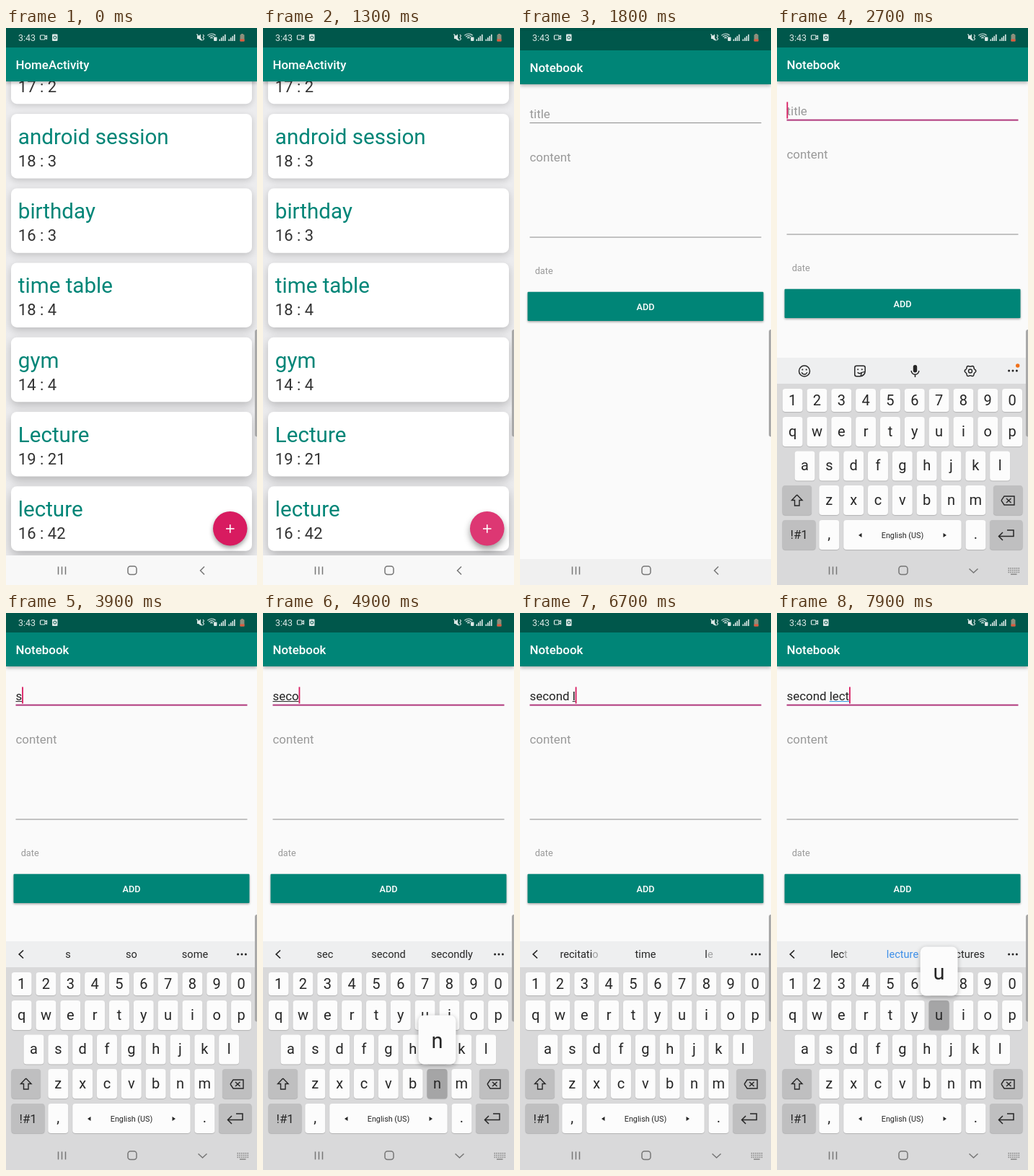
These frames come from a looping animation (348x772 px, 8 s). An HTML page with a canvas:

```html
<!DOCTYPE html>
<html lang="en">
<head>
<meta charset="utf-8">
<title>Notebook</title>
<style>
html, body { margin: 0; width: 348px; height: 772px; overflow: hidden; background: #000; }
canvas { display: block; width: 348px; height: 772px; }
</style>
</head>
<body>
<canvas id="stage"></canvas>
<script>
const W = 348, H = 772, LOOP = 8000, TICK = 100;
const FONT = 'Roboto, "Noto Sans", sans-serif';
const TEAL = '#008577', DARK = '#00574b', PINK = '#d81b60';
const dpr = window.devicePixelRatio || 1;
const stage = document.getElementById('stage');
const layer = document.createElement('canvas');
for (const c of [stage, layer]) { c.width = W * dpr; c.height = H * dpr; }
const main = stage.getContext('2d'), sub = layer.getContext('2d');
main.scale(dpr, dpr);
sub.scale(dpr, dpr);
let g = main;

function rect(x, y, w, h, fill) {
  g.fillStyle = fill;
  g.fillRect(x, y, w, h);
}

function box(x, y, w, h, r) {
  g.beginPath();
  g.roundRect(x, y, w, h, r);
}

function panel(x, y, w, h, r, fill, blur = 0, dy = 0, shade = 0) {
  g.save();
  if (shade) {
    g.shadowColor = `rgba(0,0,0,${shade})`;
    g.shadowBlur = blur * dpr;
    g.shadowOffsetY = dy * dpr;
  }
  g.fillStyle = fill;
  box(x, y, w, h, r);
  g.fill();
  g.restore();
}

function text(s, x, y, size, color, align = 'left', weight = 400) {
  g.font = `${weight} ${size}px ${FONT}`;
  g.textAlign = align;
  g.fillStyle = color;
  g.fillText(s, x, y);
  return g.measureText(s).width;
}

function disc(x, y, r, fill) {
  g.fillStyle = fill;
  g.beginPath();
  g.arc(x, y, r, 0, 7);
  g.fill();
}

function line(color, width, ...pts) {
  g.strokeStyle = color;
  g.lineWidth = width;
  g.beginPath();
  for (let i = 0; i < pts.length; i += 2) g.lineTo(pts[i], pts[i + 1]);
  g.stroke();
}

function outline(color, width, x, y, w, h, r) {
  g.strokeStyle = color;
  g.lineWidth = width;
  box(x, y, w, h, r);
  g.stroke();
}

function ring(color, width, x, y, r, from = 0, to = 2 * Math.PI) {
  g.strokeStyle = color;
  g.lineWidth = width;
  g.beginPath();
  g.arc(x, y, r, from, to);
  g.stroke();
}

function appBar(title) {
  panel(0, 27, W, 47, 0, TEAL, 5, 2, 0.3);
  rect(0, 0, W, 27, DARK);
  text(title, 13.5, 57, 16.9, '#fff', 'left', 500);
}

// ---------- system bars ----------
function statusIcons() {
  const c = '#dce8e6';
  text('3:43', 17, 17.5, 12.4, c);
  outline(c, 1.2, 47.5, 10, 6.5, 6, 1);
  line(c, 1.2, 54, 12, 56.5, 10.8, 56.5, 15.2, 54, 14);
  panel(64, 8.5, 7.5, 9.5, 1, c);
  ring(DARK, 1, 67.8, 13.2, 2);
  g.fillStyle = c;
  g.beginPath();
  for (const p of [[265, 11], [267, 11], [270, 8.5], [270, 17.5], [267, 15], [265, 15]]) g.lineTo(...p);
  g.fill();
  line(c, 1.2, 264.5, 8.5, 272, 17.5);
  line(c, 1.1, 273, 9, 274.5, 11, 273, 13, 274.5, 15, 273, 17);
  for (const r of [8, 5.3, 2.6]) ring(c, 1.2, 285, 16, r, -2.35, -0.8);
  panel(288, 12.5, 4.5, 5.5, 1, c);
  for (const x of [295.5, 308.5])
    for (let i = 0; i < 4; i++) rect(x + i * 2.5, 15.5 - i * 2.2, 1.6, 2.5 + i * 2.2, c);
  panel(324.5, 9, 6, 9.5, 1, '#8c8f7c');
  rect(326, 8, 3, 1, '#8c8f7c');
  rect(324.5, 15.5, 6, 3, '#e0593c');
}

function navIcons(typing) {
  const c = '#767676';
  for (const x of [72.5, 77.5, 82.5]) line(c, 1.5, x, 746.5, x, 757.5);
  outline(c, 1.5, 169, 746, 12, 11.5, 3.5);
  if (!typing) return line(c, 1.5, 275, 746.5, 269.5, 752, 275, 757.5);
  line(c, 1.5, 266.5, 749.5, 272.5, 755, 278.5, 749.5);
  for (let r = 0; r < 3; r++)
    for (let k = 0; k < 6; k++) rect(320.5 + k * 2.8, 748 + r * 2.8, 1.6, 1.6, '#8a8a8a');
  rect(324, 756.4, 8.5, 1.5, '#8a8a8a');
}

// ---------- list screen ----------
const notes = [
  ['', '17 : 2'], ['android session', '18 : 3'], ['birthday', '16 : 3'], ['time table', '18 : 4'],
  ['gym', '14 : 4'], ['Lecture', '19 : 21'], ['lecture', '16 : 42'], ['', '']
];

function home(t) {
  rect(0, 0, W, H, '#ececee');
  notes.forEach(([title, time], i) => {
    const y = 15.7 + i * 103.25;
    panel(7, y, 334, 89.5, 8, '#fff', 9 + i, 2 + i * 0.7, 0.17 + i * 0.012);
    text(title, 16.8, y + 42, 29.6, TEAL);
    text(time, 16.8, y + 73, 22, '#333');
  });
  const held = t >= 1300;
  panel(287, 670, 47.5, 47.5, 24, PINK, held ? 10 : 6, held ? 5 : 3, 0.4);
  if (held) disc(310.75, 693.75, 23.7, `rgba(255,255,255,${t < 1400 ? 0.12 : 0.2})`);
  line('#fff', 1.6, 305, 694, 316.5, 694);
  line('#fff', 1.6, 310.75, 688.2, 310.75, 699.8);
  appBar('HomeActivity');
  rect(0, 731, W, 41, '#f8f8f8');
}

// ---------- typing timeline: [key, pressed, released, shown] ----------
const strokes = [
  ['s', 3700, 3900, 3900], ['e', 4000, 4200, 4200], ['c', 4300, 4500, 4500],
  ['o', 4600, 4800, 4700], ['n', 4900, 5100, 5000], ['d', 5200, 5400, 5500],
  [' ', 6100, 6200, 6300], ['l', 6400, 6600, 6600], ['e', 7100, 7300, 7200],
  ['c', 7300, 7500, 7500], ['t', 7600, 7800, 7700], ['u', 7900, 8100, 8100]
];

// [start, words, fully opaque letters per word, highlighted slot]
const hints = [
  [3900, ['s', 'so', 'some']],
  [4200, ['se', 'see', 'send']],
  [4500, ['sec', 'second', 'secondly']],
  [5500, ['second', 'seconds', 'secondly']],
  [6300, ['recitation', 'time', 'lesson']],
  [6700, ['recitation', 'time', 'le'], [8, 4, 1]],
  [6800, ['l', 'lecture', 'let']],
  [7200, ['le', 'lecture', 'let']],
  [7500, ['lec', 'lecture', 'lectures']],
  [7800, ['lect', 'lecture', 'lectures'], [3, 7, 8], 1]
];

const typed = t => strokes.filter(s => t >= s[3]).map(s => s[0]).join('');

function cursorOn(t) {
  return t >= 2300 && !(t >= 2900 && t < 3400) && !(t >= 5900 && t < 6100);
}

// ---------- editor screen ----------
function editor(t) {
  rect(0, 0, W, H, '#fafafa');
  rect(0, 732, W, 40, '#f0f0f0');
  appBar('Notebook');
  const s = typed(t), size = 16.9;
  let end = 14;
  if (s) {
    end += text(s, 13.5, 120.5, size, '#222');
    const from = s.indexOf(' ') + 1;
    const x = 13.5 + g.measureText(s.slice(0, from)).width;
    if (s.length > from) rect(x, 122, end - x - 0.5, 1.1, t >= 7800 ? '#3a9be0' : '#333');
  } else {
    text('title', 13.5, 120.5, size, '#999');
  }
  if (t >= 2300) rect(13.5, 126.6, 321, 2, '#b0387c');
  else rect(13.5, 127, 321, 1, '#8c8c8c');
  if (cursorOn(t)) rect(end - 0.6, 102.5, 1.8, 23, PINK);
  text('content', 13.5, 181, size, '#999');
  rect(13.5, 285.5, 321, 1, '#8c8c8c');
  text('date', 20.7, 337.2, 12.7, '#999');
  panel(10.5, 361.7, 327, 40.3, 1, TEAL, 3, 1.5, 0.35);
  text('ADD', 174, 386.7, 12.7, '#fff', 'center', 500);
}

// ---------- keyboard ----------
const STEP = 33.83, INK = '#262626';
const rows = [
  ['1234567890', 21.6, 498, 32], ['qwertyuiop', 21.6, 537, 41],
  ['asdfghjkl', 38.5, 584.5, 41], ['zxcvbnm', 72.3, 632, 41]
];

function key(x, y, w, h, fill = '#fcfcfc') {
  panel(x, y, w, h, 4, fill, 1, 0.8, 0.22);
}

function tools() {
  ring(INK, 1.5, 38, 473.5, 7.5);
  disc(35.3, 471.5, 1.1, INK);
  disc(40.7, 471.5, 1.1, INK);
  ring(INK, 1.4, 38, 474, 4, 0.3, 2.84);
  outline(INK, 1.5, 107.8, 466.3, 14.4, 14.4, [2.5, 2.5, 7, 2.5]);
  line(INK, 1.3, 122, 474.5, 117.5, 475.5, 116, 480.5);
  disc(112.2, 471.3, 1, INK);
  disc(117.8, 471.3, 1, INK);
  ring(INK, 1.3, 114.5, 473.5, 3.2, 0.6, 2.6);
  panel(188.8, 465, 5.4, 10.5, 2.7, INK);
  ring(INK, 1.5, 191.5, 473, 5.3, 0, Math.PI);
  line(INK, 1.5, 191.5, 478, 191.5, 482);
  g.strokeStyle = INK;
  g.lineWidth = 1.5;
  g.beginPath();
  for (let i = 0; i < 48; i++) {
    const a = i * Math.PI / 24, r = 7 + 0.8 * Math.cos(6 * a);
    g.lineTo(268 + r * Math.cos(a), 473.5 + r * Math.sin(a));
  }
  g.closePath();
  g.stroke();
  ring(INK, 1.4, 268, 473.5, 2.5);
}

function suggestions(t) {
  line('#222', 1.7, 24, 467.5, 18.2, 473, 24, 478.5);
  const [, words, solid, hot] = hints.filter(h => t >= h[0]).pop();
  words.forEach((word, i) => {
    const n = solid ? solid[i] : word.length, size = 14.6;
    g.font = `400 ${size}px ${FONT}`;
    let x = 86 + i * 88 - g.measureText(word).width / 2;
    x += text(word.slice(0, n), x, 478, size, i === hot ? '#3d8fe8' : INK);
    text(word.slice(n, n + 1), x, 478, size, 'rgba(38,38,38,.38)');
  });
}

function keyboard(t) {
  const down = strokes.find(s => t >= s[1] && t < s[2]);
  const held = down && down[0];
  rect(0, 455, W, 36.5, '#eeeff0');
  rect(0, 491, W, H - 491, '#d9d9da');
  const suggesting = t >= hints[0][0];
  if (suggesting) suggestions(t);
  else tools();
  for (const x of [321.6, 327, 332.4]) disc(x, 473, 1.5, '#222');
  if (!suggesting) disc(333.7, 466, 2.7, '#f0701a');

  let pop = null;
  for (const [chars, x0, y, h] of rows) {
    [...chars].forEach((c, i) => {
      const x = x0 + i * STEP;
      key(x - 14, y, 28, h, c === held ? '#a5a5a6' : undefined);
      text(c, x, y + h / 2 + (h < 40 ? 7.2 : 6.3), 20, INK, 'center');
      if (c === held) pop = [c, x, y];
    });
  }
  const grey = '#bfbfc0';
  key(7.5, 632, 40.5, 41, grey);
  key(300, 632, 40.5, 41, grey);
  key(7.5, 680, 46, 41, grey);
  key(58.3, 680, 28, 41);
  key(92.2, 680, 163.5, 41, held === ' ' ? '#a5a5a6' : undefined);
  key(261.5, 680, 28, 41);
  key(295, 680, 45.5, 41, grey);

  line(INK, 1.4, 27.7, 645, 20.5, 652.5, 24.5, 652.5, 24.5, 660, 31, 660, 31, 652.5, 35, 652.5, 27.7, 645);
  line(INK, 1.4, 311, 653, 315, 647, 329, 647, 329, 659, 315, 659, 311, 653);
  line(INK, 1.4, 318, 650, 324.5, 656);
  line(INK, 1.4, 324.5, 650, 318, 656);
  text('!#1', 30.7, 706.5, 17, INK, 'center');
  text(',', 72.3, 706, 20, INK, 'center');
  text('.', 275.5, 706, 20, INK, 'center');
  text('English (US)', 174, 704.6, 10.8, INK, 'center');
  for (const [x, d] of [[115.5, -1], [232.5, 1]]) {
    g.fillStyle = INK;
    g.beginPath();
    g.moveTo(x + 2.5 * d, 701);
    g.lineTo(x - 2 * d, 698);
    g.lineTo(x - 2 * d, 704);
    g.fill();
  }
  line(INK, 1.5, 313, 697, 307.5, 702.5, 313, 708);
  line(INK, 1.5, 307.5, 702.5, 328, 702.5, 328, 694, 319, 694);

  if (pop) {
    const [c, x, y] = pop;
    panel(x - 26, y - 74.5, 52, 68, 8, '#fcfcfc', 6, 2, 0.3);
    text(c, x, y - 29, 29, INK, 'center');
  }
}

// ---------- frame ----------
function draw(t) {
  const opened = t >= 1600, typing = t >= 2400;
  const rise = t < 2000 ? 125 * Math.exp((1600 - t) / 58) : 0;
  g = main;
  rect(0, 0, W, H, '#000');
  if (t < 2000) {
    g.save();
    if (opened) g.translate(0, -7 - Math.min(5, (t - 1600) / 40));
    home(t);
    g.restore();
    if (opened) rect(0, 0, W, H, 'rgba(0,0,0,.04)');
  }
  if (opened) {
    g = sub;
    g.clearRect(0, 0, W, H);
    editor(t);
    g = main;
    g.globalAlpha = t < 1700 ? 0.93 : 1;
    g.drawImage(layer, 0, rise, W, H);
    g.globalAlpha = 1;
  }
  if (typing) {
    rect(0, 732, W, 40, '#d9d9da');
    g.save();
    if (t < 3000) g.translate(0, 316 * Math.exp((2350 - t) / 69));
    keyboard(t);
    g.restore();
  }
  statusIcons();
  navIcons(typing);
  panel(345, 418, 6, 148.5, 3, '#a9a9a9');
}

function loop() {
  const t = performance.now() % LOOP;
  draw(Math.floor(t / TICK) * TICK);
  requestAnimationFrame(loop);
}
loop();
</script>
</body>
</html>
```
